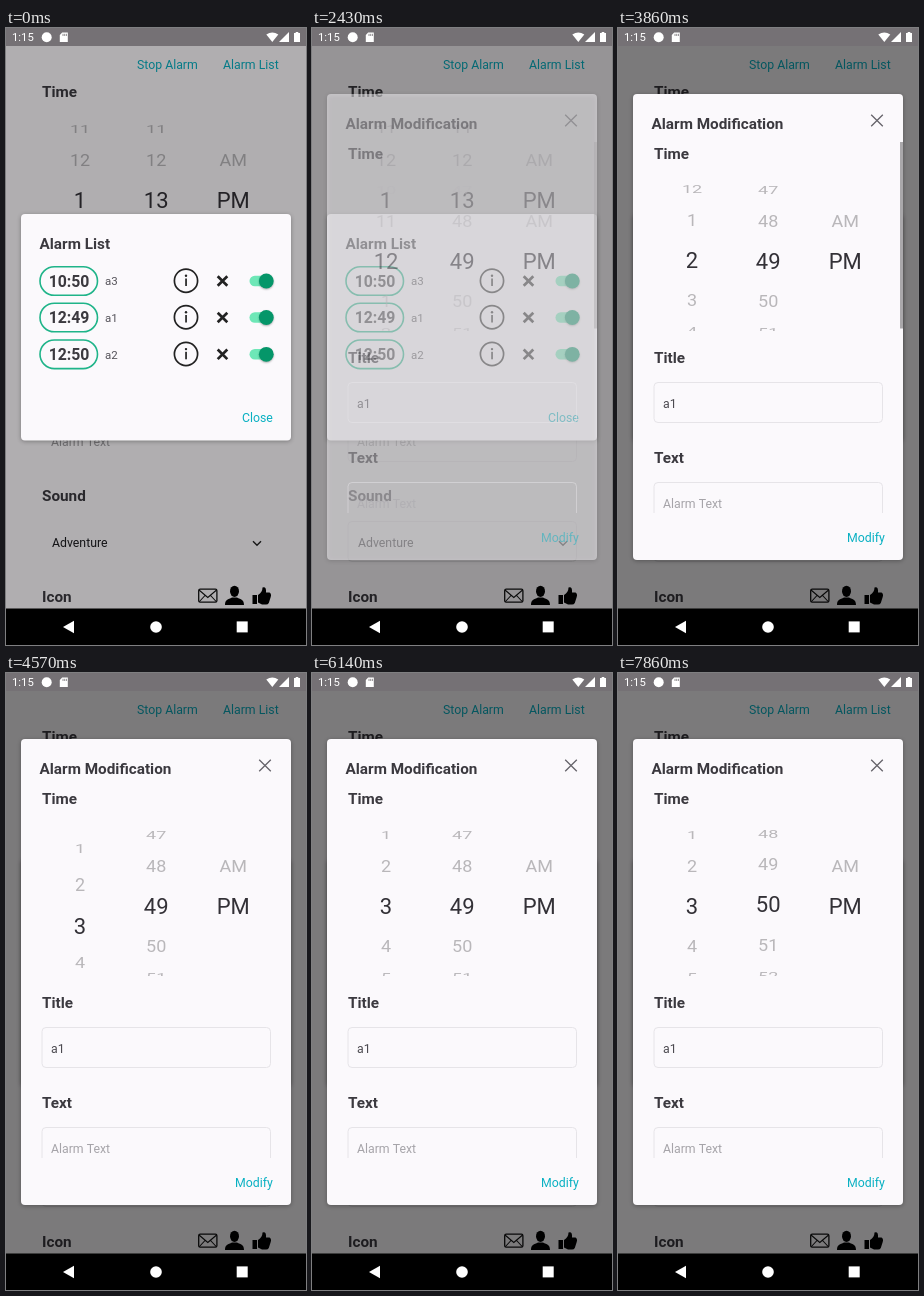
An HTML page with a canvas that plays this animation: 300x617 px, repeating every 8 s.

```html
<!DOCTYPE html>
<html lang="en">
<head>
<meta charset="utf-8">
<title>Alarm app</title>
<style>
  html, body { margin: 0; width: 100%; height: 100%; overflow: hidden; background: #000; }
  canvas { display: block; width: 300px; height: 617px; }
</style>
</head>
<body>
<canvas id="stage" width="300" height="617"></canvas>
<script>
const ctx = document.getElementById('stage').getContext('2d');
const LOOP = 8000, STEP = 1000 / 7;
const PAPER = '#fbf9fc', INK = '#3b393f', MUTED = '#b9b7ba', TEAL = '#08b0c2';
const LINE = '#e6e4e8', STATUS = '#757175';

// Linear interpolation through [time, value] points, held at both ends.
function track(t, points) {
  if (t <= points[0][0]) return points[0][1];
  for (let i = 1; i < points.length; i++) {
    const [t0, v0] = points[i - 1], [t1, v1] = points[i];
    if (t <= t1) return v0 + (v1 - v0) * (t - t0) / (t1 - t0);
  }
  return points[points.length - 1][1];
}

function text(str, x, y, size, color = INK, weight = 400, align = 'left') {
  ctx.font = `${weight} ${size}px Roboto, sans-serif`;
  ctx.textAlign = align;
  ctx.fillStyle = color;
  ctx.fillText(str, x, y);
}
const heading = (str, x, y) => text(str, x, y, 15.3, INK, 700);
const link = (str, x, y) => text(str, x, y, 12.3, TEAL);

function fillRect(x, y, w, h, color) {
  ctx.fillStyle = color;
  ctx.fillRect(x, y, w, h);
}

function fillCircle(x, y, r, color) {
  ctx.fillStyle = color;
  ctx.beginPath();
  ctx.arc(x, y, r, 0, 7);
  ctx.fill();
}

function polygon(points, color) {
  ctx.fillStyle = color;
  ctx.beginPath();
  points.forEach(p => ctx.lineTo(...p));
  ctx.closePath();
  ctx.fill();
}

function strokeLines(color, width, ...lines) {
  ctx.strokeStyle = color;
  ctx.lineWidth = width;
  ctx.beginPath();
  for (const line of lines) line.forEach((p, i) => i ? ctx.lineTo(...p) : ctx.moveTo(...p));
  ctx.stroke();
}

function roundBox(x, y, w, h, r) {
  ctx.beginPath();
  ctx.roundRect(x, y, w, h, r);
}

function cross(x, y, r, width, color) {
  strokeLines(color, width, [[x - r, y - r], [x + r, y + r]], [[x + r, y - r], [x - r, y + r]]);
}

function faded(alpha, paint) {
  ctx.save();
  ctx.globalAlpha *= alpha;
  paint();
  ctx.restore();
}

function field(y) {
  ctx.strokeStyle = LINE;
  ctx.lineWidth = 1;
  roundBox(36, y + 0.5, 228.5, 40, 4);
  ctx.stroke();
}

function card(y, h) {
  ctx.save();
  ctx.shadowColor = 'rgba(0,0,0,.3)';
  ctx.shadowBlur = 4;
  ctx.shadowOffsetY = 1;
  ctx.fillStyle = PAPER;
  roundBox(15, y, 270, h, 4);
  ctx.fill();
  ctx.restore();
}

const dim = () => fillRect(0, 0, 300, 617, 'rgba(0,0,0,.3)');

// Labels wrapped around a cylinder and squeezed towards its edges.
function wheel(x, cy, pos, label) {
  const radius = 87, angle = 0.478;
  for (let n = Math.round(pos) - 3; n <= Math.round(pos) + 3; n++) {
    const a = (n - pos) * angle, str = label(n);
    if (!str || Math.abs(a) > 1.3) continue;
    const active = Math.abs(n - pos) < 0.5, size = active ? 22 : 18;
    ctx.save();
    ctx.translate(x, cy + radius * Math.sin(a));
    ctx.scale(1, Math.cos(a));
    text(str, 0, size * 0.355, size, active ? '#333137' : MUTED, 400, 'center');
    ctx.restore();
  }
}

const hourLabel = n => String((n + 11) % 12 + 1);
const minuteLabel = n => String((n + 60) % 60).padStart(2, '0');
const halfLabel = n => ['AM', 'PM'][n];

function timePicker(cy, hour, minute) {
  ctx.save();
  ctx.beginPath();
  ctx.rect(36, cy - 78, 228, 147.5);
  ctx.clip();
  wheel(74, cy, hour, hourLabel);
  wheel(150.2, cy, minute, minuteLabel);
  wheel(227.2, cy, 1, halfLabel);
  ctx.restore();
}

function pageIcons() {
  ctx.strokeStyle = '#111';
  ctx.lineWidth = 1.3;
  roundBox(192.7, 561.2, 18.2, 13, 1.5);
  ctx.stroke();
  strokeLines('#111', 1.1, [[193, 562], [201.8, 569.5], [210.6, 562]],
    [[193, 574], [199, 567.5]], [[210.6, 574], [204.6, 567.5]]);

  ctx.fillStyle = '#000';
  ctx.beginPath();
  ctx.ellipse(228.5, 563.3, 4.5, 5.6, 0, 0, 7);
  ctx.fill();
  ctx.beginPath();
  ctx.moveTo(219, 577);
  ctx.bezierCurveTo(219, 571.5, 222, 571.5, 226, 569.5);
  ctx.lineTo(231, 569.5);
  ctx.bezierCurveTo(235, 571.5, 238, 571.5, 238, 577);
  ctx.fill();

  fillRect(246.5, 567, 4.5, 9, '#000');
  ctx.beginPath();
  ctx.moveTo(252, 567);
  ctx.quadraticCurveTo(256.5, 564, 256.5, 559.5);
  ctx.quadraticCurveTo(260.5, 558, 260, 564.5);
  ctx.lineTo(263.5, 564.5);
  ctx.quadraticCurveTo(265.8, 566, 264.7, 569);
  ctx.lineTo(262.8, 575);
  ctx.quadraticCurveTo(262, 576.5, 260, 576.5);
  ctx.lineTo(256, 576.5);
  ctx.lineTo(252, 574.5);
  ctx.fill();
}

function page(t) {
  fillRect(0, 0, 300, 617, PAPER);
  link('Stop Alarm', 131, 41);
  link('Alarm List', 217, 41);
  heading('Time', 36, 69);
  timePicker(172.3, 13, 13);
  faded(track(t, [[0, 0], [430, 1]]), () => {
    field(393);
    field(493);
  });
  text('Alarm Text', 45, 418, 12.3, '#9c9a9e');
  heading('Sound', 36, 473);
  text('Adventure', 46, 519, 12.3, '#1d1c20');
  strokeLines('#222', 1.4, [[247, 513.3], [251, 517.3], [255, 513.3]]);
  heading('Icon', 36, 574);
  pageIcons();
}

function alarmRow(y, time, name) {
  ctx.strokeStyle = '#1fb489';
  ctx.lineWidth = 1.6;
  roundBox(34, y - 14.3, 57.5, 28.6, 14.3);
  ctx.stroke();
  text(time, 63, y + 5.8, 15.8, INK, 700, 'center');
  text(name, 99, y + 4.3, 11.5, '#55535a');

  ctx.strokeStyle = '#222';
  ctx.lineWidth = 1.7;
  ctx.beginPath();
  ctx.arc(180, y - 0.3, 11.6, 0, 7);
  ctx.stroke();
  fillCircle(180, y - 5.2, 1.2, '#222');
  fillRect(179.2, y - 2.5, 1.7, 7.5, '#222');
  cross(216.5, y, 4.8, 2.7, '#222');

  ctx.fillStyle = '#6ee7b7';
  roundBox(243.5, y - 5.3, 22, 10.6, 5.3);
  ctx.fill();
  ctx.save();
  ctx.shadowColor = 'rgba(0,0,0,.3)';
  ctx.shadowBlur = 2;
  ctx.shadowOffsetY = 1;
  fillCircle(260.3, y, 7.4, '#059669');
  ctx.restore();
}

function alarmList() {
  dim();
  card(186, 226.5);
  heading('Alarm List', 33.5, 221);
  alarmRow(253, '10:50', 'a3');
  alarmRow(289.5, '12:49', 'a1');
  alarmRow(326.3, '12:50', 'a2');
  link('Close', 236, 394);
}

function editor(t) {
  // Each wheel is dragged a little too far, held, then snaps back.
  const hour = track(t, [[3000, 12], [3860, 14.05], [5430, 15.1], [5570, 15.1], [6140, 15]]);
  const minute = track(t, [[6430, 49], [6857, 50.24], [7290, 50.24], [7857, 50.05]]);
  dim();
  card(66, 466);
  heading('Alarm Modification', 33.5, 101);
  cross(259, 92.5, 5.8, 1.3, '#65636a');
  link('Modify', 229, 514);
  heading('Time', 36, 131);
  timePicker(233.6, hour, minute);
  heading('Title', 36, 335);
  field(354);
  text('a1', 45, 380, 12.3, '#4a484e');
  heading('Text', 36, 435);
  ctx.save();
  ctx.beginPath();
  ctx.rect(15, 114, 270, 371);
  ctx.clip();
  field(454);
  text('Alarm Text', 45, 480, 12.3, '#a6a4a9');
  ctx.restore();
  faded(track(t, [[3900, 1], [4350, 0]]), () => fillRect(282, 114, 3, 186.5, '#aaa8ab'));
}

function systemBars() {
  fillRect(0, 0, 300, 18, STATUS);
  text('1:15', 6, 13.3, 11.3, '#fff');
  fillCircle(40.7, 9.2, 5, '#fff');
  polygon([[56.2, 4.5], [61.8, 4.5], [61.8, 14], [53.8, 14], [53.8, 7]], '#fff');
  strokeLines(STATUS, 0.8, [[57, 5.8], [57, 8]], [[58.7, 5.8], [58.7, 8]], [[60.4, 5.8], [60.4, 8]]);
  ctx.fillStyle = '#fff';
  ctx.beginPath();
  ctx.moveTo(266.3, 14);
  ctx.lineTo(260.3, 6.6);
  ctx.quadraticCurveTo(266.3, 2.4, 272.3, 6.6);
  ctx.fill();
  polygon([[283, 4], [283, 14], [273, 14]], '#fff');
  fillRect(288, 5, 6, 9, '#fff');
  fillRect(289.7, 4, 2.6, 1, '#fff');

  fillRect(0, 580.5, 300, 37, '#000');
  polygon([[57, 599], [68, 592.7], [68, 605.3]], '#fff');
  fillCircle(150, 599, 5.8, '#fff');
  fillRect(230.7, 593.4, 11, 11, '#fff');
}

function draw(time) {
  const t = Math.floor((time % LOOP + 6) / STEP) * STEP;
  page(t);
  alarmList();
  const opening = track(t, [[2300, 0], [2560, 1]]);
  if (opening > 0) faded(opening, () => editor(t));
  systemBars();
}

const start = performance.now();
function tick() {
  draw(performance.now() - start);
  requestAnimationFrame(tick);
}
tick();
</script>
</body>
</html>
```
